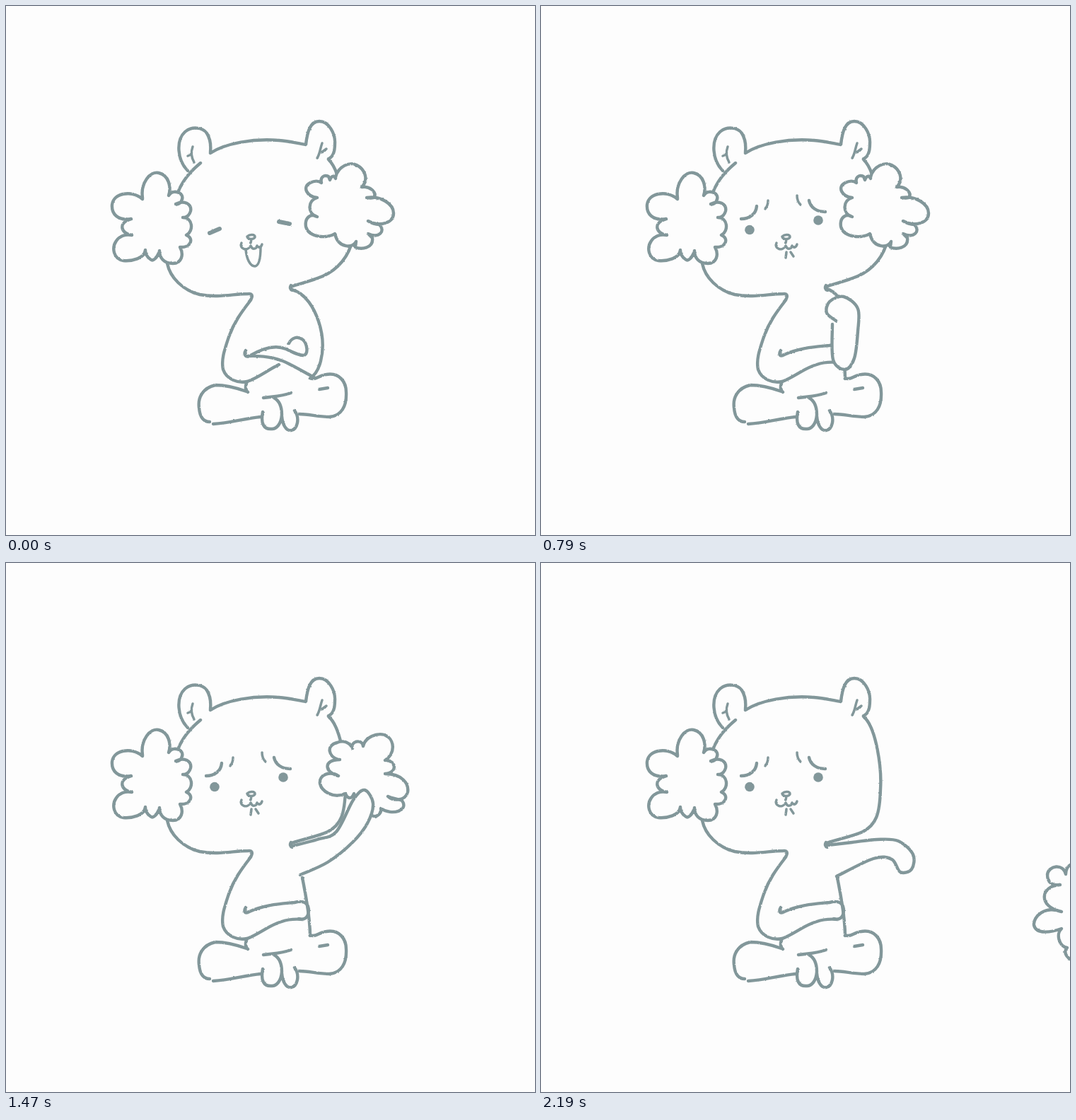
An HTML page for the animation above (2300 ms loop, 748 by 748 pixels).

```html
<!DOCTYPE html>
<html lang="en">
<head>
<meta charset="utf-8">
<title>Bear with pompoms</title>
<style>
html, body { margin: 0; width: 100%; height: 100%; overflow: hidden; background: #fdfdfd; }
svg { display: block; width: 100vw; height: 100vh; }
path { fill: none; stroke: #82979a; stroke-width: 4.4; stroke-linecap: round; stroke-linejoin: round; }
.solid { fill: #fdfdfd; }
.fine { stroke-width: 3.5; }
.bold { stroke-width: 6; }
.eye { fill: #82979a; }
</style>
</head>
<body>
<svg viewBox="0 0 748 748">
  <filter id="pencil" filterUnits="userSpaceOnUse" x="0" y="0" width="748" height="748" color-interpolation-filters="sRGB">
    <feTurbulence type="fractalNoise" baseFrequency=".3" numOctaves="2" seed="4"/>
    <feDisplacementMap in="SourceGraphic" scale="2" xChannelSelector="R" yChannelSelector="G"/>
  </filter>
  <g id="scene" filter="url(#pencil)"></g>
</svg>
<script>
const LOOP = 2300;
const STEPS = [0, 150, 200, 260, 310, 360, 470, 630, 680, 740, 790, 840, 950, 1100, 1150,
  1260, 1310, 1360, 1420, 1470, 1570, 1680, 1780, 1880, 1930, 1990, 2090, 2190];

const EARS = 'M257,233C242,218 240,190 253,178C262,170 278,171 284,180C289,188 290,196 289,206' +
  'M424,196C426,178 430,163 443,163C456,163 466,180 465,195C465,207 461,214 456,216';
const EAR_LINES = 'M264,199C261,207 262,214 266,221M257,212L262,210M447,194C444,202 444,209 440,215M453,202L446,207';
const HEAD = 'M289,208C310,194 350,187 386,190C402,191 414,195 424,196M275,222C258,236 248,250 243,264' +
  'M228,364C232,384 250,402 274,408C300,413 322,407 342,407C350,406 349,412 344,418';
const CHEEK = 'M456,217C462,223 466,232 468,238M488,338C480,362 462,378 440,385C428,390 412,393 403,397';
const BARE_CHEEK = 'M456,217C474,232 482,290 480,320C479,355 474,370 455,380C440,387 420,390 404,396';
const TORSO = 'M403,395C401,398 402,401 405,402M346,416C332,434 322,448 315,468C309,486 304,500 307,514' +
  'C312,528 328,534 341,531C338,537 338,543 342,546';
const LEGS = 'M340,545C326,540 310,536 296,536C278,540 271,554 273,568C274,582 280,588 288,588' +
  'M293,591C316,590 338,583 360,581M430,526C437,530 443,522 453,521C472,518 481,532 481,546' +
  'C482,566 474,580 457,581C442,581 428,577 415,577';
const FEET = 'M364,554C378,552 390,552 403,547M379,554C388,559 390,568 390,578C389,592 382,598 376,598' +
  'C364,599 360,590 363,574M390,580C391,592 396,601 403,600C412,599 416,583 408,572M443,542L455,540';
const CROSSED = 'M339,487C336,492 338,497 344,495C364,483 382,479 396,485C406,490 414,494 421,494' +
  'C428,492 426,478 420,472C412,466 404,469 400,477M342,495C366,494 386,498 402,507C414,513 426,520 437,526' +
  'M341,531C356,526 368,516 386,507';
const RESTING = 'M339,487C336,492 337,497 344,493C366,483 388,482 408,480C420,477 427,480 428,490C428,502 422,505 414,503' +
  'M341,531C356,526 372,512 390,507C398,504 408,503 420,504';
const SHOULDER = 'M404,401C424,406 436,428 442,446C450,470 448,490 445,502C442,514 437,522 430,526';
const SIDE = 'M419,445C424,470 430,504 430,527';

const LEFT_POM = 'M193,271C190,250 204,233 216,236C230,239 234,256 230,268C236,258 252,264 249,273C248,278 244,281 240,280' +
  'C252,274 263,280 261,290C259,297 255,299 250,299C264,299 266,318 255,324C266,328 262,342 246,341' +
  'C252,352 248,364 236,364C223,364 217,356 217,346C214,356 208,362 204,358C198,354 197,350 197,345' +
  'C196,357 178,361 166,360C152,358 149,342 156,332C160,326 168,322 178,324C162,322 158,306 177,301' +
  'C158,304 149,294 150,281C152,264 178,260 193,273Z';
const POM = {
  worn: 'M466,242C470,226 486,220 496,225C508,231 513,246 503,256C514,254 524,263 521,270C518,273 514,271 510,271' +
    'C530,268 548,280 548,293C548,306 530,313 512,304C518,308 524,309 528,309C537,318 528,329 512,322L518,328' +
    'C520,342 503,345 494,341L495,333C492,342 470,344 465,322C455,329 428,328 424,312C422,298 432,293 440,298' +
    'C426,294 426,275 440,271C426,270 418,256 430,250C436,247 442,247 446,250C444,242 450,238 456,241' +
    'L458,246C460,240 464,239 466,244Z',
  held: 'M470,278C456,274 452,258 468,254C478,250 486,254 490,262C486,252 504,248 505,259C508,246 524,240 535,243' +
    'C549,248 552,268 536,279C550,278 556,296 536,298C560,298 570,312 568,324C564,338 546,336 540,330' +
    'C546,333 556,334 560,336C570,350 546,358 530,347C532,356 520,364 512,352C504,344 496,340 492,326' +
    'C488,336 482,332 480,326C462,334 446,322 444,312C442,298 460,294 470,301C450,296 448,278 472,278Z',
  thrown: 'M638,414C638,402 652,398 654,413C656,402 665,400 666,409C672,394 692,392 697,405C700,416 694,428 682,432' +
    'C700,426 716,434 713,444C710,452 700,454 690,454C710,450 726,460 723,473C720,486 708,490 697,487' +
    'C712,488 710,506 690,497C692,512 682,518 671,516C662,514 658,508 658,500C660,514 634,518 633,498' +
    'C625,496 628,484 638,478C618,484 594,482 596,466C600,454 616,452 630,454C608,456 598,428 630,435' +
    'C610,430 606,404 630,407C635,408 637,411 638,414Z',
  leaving: 'M760,424C748,424 742,430 742,440C738,424 718,428 716,440C716,452 722,456 734,455C706,456 702,486 736,493' +
    'C712,484 696,500 697,512C700,526 722,522 736,517C728,524 732,542 744,544C738,550 742,560 760,566'
};

// Arm outlines, from the inner edge round the hand and back
const ARM = [
  [680, '414,480 400,474 403,462 420,452 440,445 449,465 446,498 432,517 414,508 410,490'],
  [790, '417,445 404,434 408,418 428,411 448,428 448,460 443,498 430,514 413,500 412,450'],
  [1100, '458,423 466,406 475,380 490,356 506,378 497,412 484,437 462,454 440,443 416,441'],
  [1150, '405,400 440,392 462,385 470,350 487,305 500,312 503,345 492,385 460,425 416,441'],
  [1470, '405,400 440,391 467,380 491,335 507,321 519,340 511,368 490,395 455,423 416,441'],
  [1880, '405,401 445,390 475,378 525,372 550,386 546,406 528,404 505,403 465,418 416,441'],
  [2190, '405,399 440,395 475,391 505,393 526,412 524,433 508,437 496,419 470,418 418,443']
].map(([time, points]) => [time, points.split(' ').map(p => p.split(',').map(Number))]);

const mix = (a, b, k) => a + (b - a) * k;
const ramp = (t, a, b) => Math.min(1, Math.max(0, (t - a) / (b - a)));
const line = (d, cls = '') => `<path d="${d}" class="${cls}"/>`;

// Smooth open curve through all points
function spline(p) {
  let d = 'M' + p[0];
  for (let i = 0; i < p.length - 1; i++) {
    const a = p[i - 1] || p[i], b = p[i], c = p[i + 1], e = p[i + 2] || c;
    d += `C${b.map((v, j) => v + (c[j] - a[j]) / 6)} ${c.map((v, j) => v - (e[j] - b[j]) / 6)} ${c}`;
  }
  return d;
}

function arm(t) {
  if (t < 680) return '';
  const i = ARM.findLastIndex(key => key[0] <= t);
  const [start, from] = ARM[i], [end, to] = ARM[i + 1] || [LOOP, from];
  const k = ramp(t, start, end);
  let out = '';
  if (t >= 790 && t < 1150) {
    const s = ramp(t, 790, 1100);
    out = line(`M404,400Q${mix(412, 434, s)},402 ${mix(420, 463, s)},411`);
  }
  return out + line(spline(from.map((p, n) => p.map((v, j) => mix(v, to[n][j], k)))), 'solid');
}

function pom(t) {
  const put = (shape, x = 0, y = 0, turn = 0, cx = 0, cy = 0) =>
    `<g transform="translate(${x} ${y}) rotate(${turn} ${cx} ${cy})">${line(POM[shape], 'solid')}</g>`;
  if (t < 1470) {
    const k = ramp(t, 1150, 1470);
    return put('worn', 20 * k, 17 * k, 25 * k, 486, 284);
  }
  if (t < 1780) {
    const k = ramp(t, 1470, 1680);
    return put('held', 75 * k, 45 * k * k, 25 * k, 506, 301);
  }
  if (t < 2190) {
    const back = 1 - ramp(t, 1780, 1880), on = ramp(t, 1880, 2190);
    return put('thrown', 101 * on - 36 * back, 42 * on - 60 * back);
  }
  return put('leaving');
}

function face(t) {
  let out = line('M341,326C345,322 353,323 352,327C349,331 342,330 341,326M347,330L346,335', 'fine') +
    line('M333,335C329,343 341,348 346,339C349,346 354,343 355,339C357,343 361,341 362,337', 'fine');
  const open = 1 - ramp(t, 100, 200);
  if (open > 0) {
    const y = depth => 343 + depth * open;
    out += line(`M339,344C340,${y(14)} 345,${y(25)} 352,${y(25)}C359,${y(24)} 360,${y(10)} 360,341`, 'fine');
  }
  if (t < 260) return out + line('M288,321L302,315M386,305L401,308', 'bold');

  out += '<circle cx="295" cy="316.5" r="6.8" class="eye"/><circle cx="392" cy="303" r="6.8" class="eye"/>';
  if (t >= 310) out += line('M283,301C294,301 304,295 305,283M379,275C381,285 390,291 402,291');
  if (t >= 470) out += line('M321,275Q321,282 317,287M362,268Q362,276 367,281M347,348L346,356M353,348L357,354', 'fine');
  else if (t >= 360) out += line('M320,281L317,287M363,277L367,281M346,351v.5M354,350v.5', 'fine');
  return out;
}

function draw(t) {
  return line(EARS + HEAD + TORSO + LEGS) + line(EAR_LINES, 'fine') + line(FEET) +
    line(t < 1260 ? CHEEK : BARE_CHEEK) +
    line(t < 630 ? CROSSED : RESTING) +
    (t < 790 ? line(SHOULDER) : '') + (t >= 680 ? line(SIDE) : '') +
    line(LEFT_POM, 'solid') + face(t) + pom(t) + arm(t);
}

const scene = document.getElementById('scene');
let shown = -1;
function tick() {
  const now = performance.now() % LOOP;
  const step = STEPS.findLast(s => s <= now);
  if (step !== shown) scene.innerHTML = draw(shown = step);
  requestAnimationFrame(tick);
}
tick();
</script>
</body>
</html>
```
